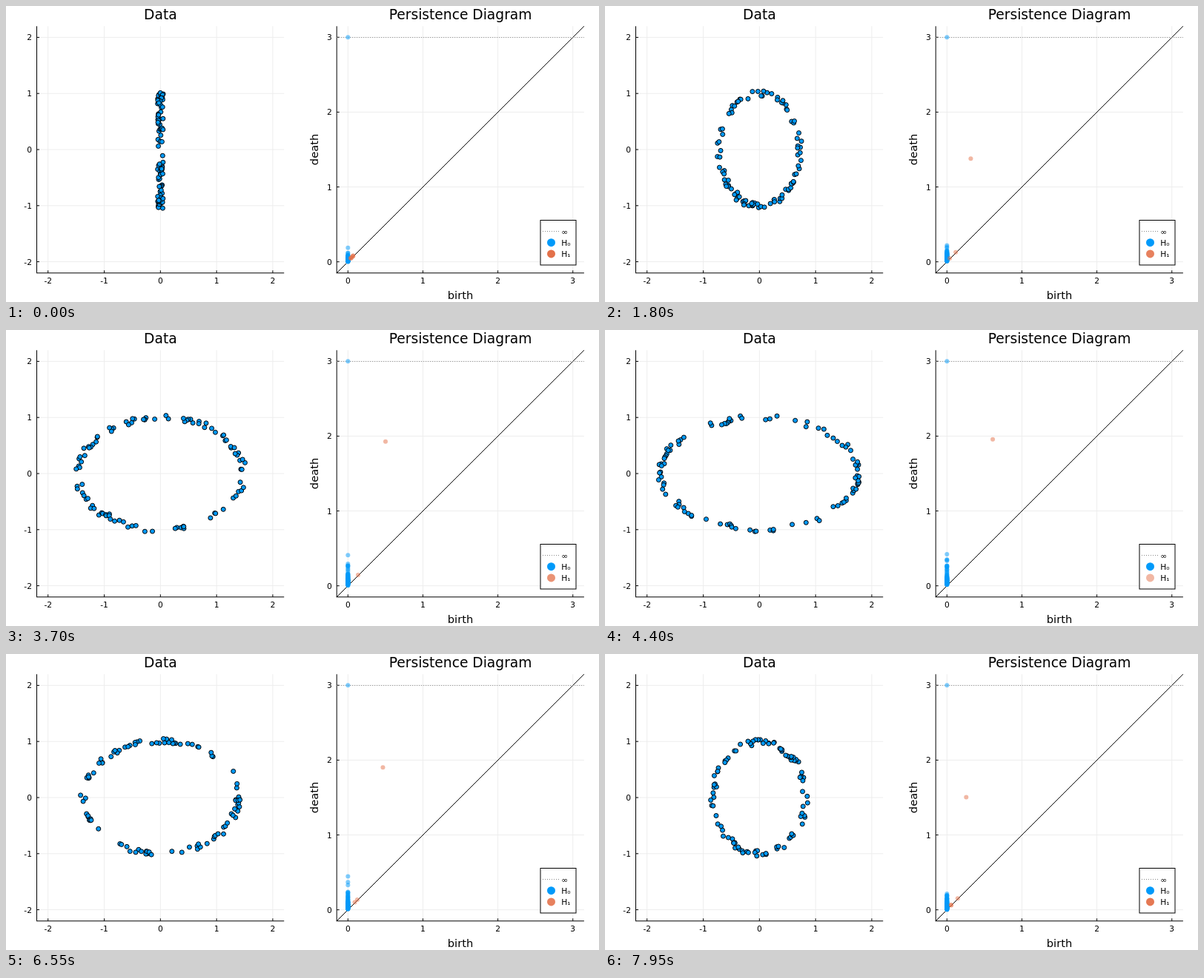
Write an HTML page with a canvas that moves like this. It is 800x400 px and loops after 8000 ms.

```html
<!DOCTYPE html>
<html lang="en">
<head>
<meta charset="utf-8">
<title>Persistence Diagram</title>
<style>
html, body { margin: 0; width: 100%; height: 100%; overflow: hidden; background: #fff; }
canvas { display: block; width: 800px; height: 400px; }
</style>
</head>
<body>
<canvas id="stage" width="800" height="400"></canvas>
<script>
const ctx = document.getElementById('stage').getContext('2d');
const BLUE = '#009afa', ORANGE = '#e36f47';
const STEP = 50, FRAMES = 160, POINTS = 100, NOISE = 0.05;
const TOP = 27.3, BOTTOM = 360.8;

const dataPlot = { left: 41.5, right: 375.2, x0: 208.3, y0: 194, scale: 75.8, ticks: [-2, -1, 0, 1, 2] };
const diagram = { left: 446.2, right: 779.9, x0: 461.3, y0: 345.7, scale: 101.15, ticks: [0, 1, 2, 3] };
const px = (plot, x) => plot.x0 + x * plot.scale;
const py = (plot, y) => plot.y0 - y * plot.scale;

function seededRandom(seed) {
  return () => {
    seed = (seed + 0x6D2B79F5) | 0;
    let t = Math.imul(seed ^ (seed >>> 15), 1 | seed);
    t = (t + Math.imul(t ^ (t >>> 7), 61 | t)) ^ t;
    return ((t ^ (t >>> 14)) >>> 0) / 4294967296;
  };
}

function line(x1, y1, x2, y2, color = '#000', width = 1, dash = []) {
  ctx.strokeStyle = color;
  ctx.lineWidth = width;
  ctx.setLineDash(dash);
  ctx.beginPath();
  ctx.moveTo(x1, y1);
  ctx.lineTo(x2, y2);
  ctx.stroke();
  ctx.setLineDash([]);
}

function text(str, x, y, size, align = 'center') {
  ctx.font = `${size}px "DejaVu Sans", sans-serif`;
  ctx.textAlign = align;
  ctx.fillStyle = '#000';
  ctx.fillText(str, x, y);
}

function dot(x, y, radius, color, alpha = 1, outlined = false) {
  ctx.globalAlpha = alpha;
  ctx.fillStyle = color;
  ctx.beginPath();
  ctx.arc(x, y, radius, 0, 2 * Math.PI);
  ctx.fill();
  ctx.globalAlpha = 1;
  if (outlined) {
    ctx.strokeStyle = '#000';
    ctx.lineWidth = 1;
    ctx.stroke();
  }
}

function drawAxes(plot, title) {
  const { left, right, ticks } = plot;
  for (const v of ticks) {
    const x = px(plot, v), y = py(plot, v);
    line(x, TOP, x, BOTTOM, '#ededed');
    line(left, y, right, y, '#ededed');
    line(x, BOTTOM, x, BOTTOM - 3.5);
    line(left, y, left + 3.5, y);
    text(String(v), x, 375, 10.67);
    text(String(v), left - 6.5, y + 4, 10.67, 'right');
  }
  line(left, TOP, left, BOTTOM);
  line(left - 0.5, BOTTOM, right, BOTTOM);
  text(title, (left + right) / 2, 17.8, 18.67);
}

// Noisy samples of an ellipse, ordered along the curve.
function sampleEllipse(a, random) {
  const jitter = () => (random() * 2 - 1) * NOISE;
  return Array.from({ length: POINTS }, () => random() * 2 * Math.PI)
    .sort((p, q) => p - q)
    .map(t => ({ x: a * Math.cos(t) + jitter(), y: Math.sin(t) + jitter() }));
}

const distance = (p, q) => Math.hypot(p.x - q.x, p.y - q.y);

// Components merge at the edge lengths of the minimum spanning tree.
function componentDeaths(points) {
  const rest = points.slice(1).map(p => ({ p, d: distance(p, points[0]) }));
  const deaths = [];
  while (rest.length) {
    let best = 0;
    rest.forEach((r, i) => { if (r.d < rest[best].d) best = i; });
    const [{ p, d }] = rest.splice(best, 1);
    deaths.push(d);
    for (const r of rest) r.d = Math.min(r.d, distance(r.p, p));
  }
  return deaths;
}

// The main loop lives from the widest gap to the ellipse's critical scale.
function loops(points, a, random) {
  const result = [];
  const count = Math.round(6 * Math.exp(-1.2 * a) + random() * 1.6 - 0.8);
  for (let i = 0; i < count; i++) {
    const r = random();
    const birth = 0.03 + 0.05 * r + 0.12 * Math.min(a, 1) * r ** 4;
    result.push([birth, birth + 0.003 + 0.01 * random()]);
  }
  const major = Math.max(a, 1), minor = Math.min(a, 1);
  const critical = major > Math.sqrt(3) * minor
    ? 2 * minor
    : 4 * Math.sqrt(3) * major * minor ** 2 / (major ** 2 + 3 * minor ** 2);
  const birth = Math.max(...points.map((p, i) => distance(p, points[(i + 1) % POINTS])));
  const death = critical - 0.02 - 0.04 * random();
  if (death > birth) result.push([birth, death]);
  return result;
}

function drawLegend(loopCount) {
  ctx.fillStyle = '#fff';
  ctx.fillRect(721, 289.5, 48, 60.5);
  ctx.strokeStyle = '#000';
  ctx.lineWidth = 1;
  ctx.strokeRect(721, 289.5, 48, 60.5);
  line(724, 304.5, 746, 304.5, '#888', 1, [1, 2]);
  dot(735.5, 319.7, 5.5, BLUE);
  dot(735.5, 334.9, 5.5, ORANGE, 1 - 0.5 ** loopCount);
  text('∞', 749.3, 308.5, 10.67, 'left');
  text('H₀', 749.3, 323.7, 10.67, 'left');
  text('H₁', 749.3, 338.9, 10.67, 'left');
}

function drawFrame(frame) {
  const random = seededRandom(frame * 7919 + 17);
  const a = 2 - Math.abs(frame - 100) * 0.02;
  const points = sampleEllipse(a, random);
  const cycles = loops(points, a, random);

  ctx.fillStyle = '#fff';
  ctx.fillRect(0, 0, 800, 400);

  drawAxes(dataPlot, 'Data');
  for (const p of points) dot(px(dataPlot, p.x), py(dataPlot, p.y), 3, BLUE, 1, true);

  drawAxes(diagram, 'Persistence Diagram');
  text('birth', 613, 396, 14.67);
  ctx.save();
  ctx.translate(421, 194);
  ctx.rotate(-Math.PI / 2);
  text('death', 0, 0, 14.67);
  ctx.restore();

  line(diagram.left, BOTTOM, diagram.right, TOP);
  line(diagram.left, 42.5, diagram.right, 42.5, '#888', 1, [1, 2]);
  const mark = (birth, death, color) => dot(px(diagram, birth), py(diagram, death), 3, color, 0.5);
  for (const death of componentDeaths(points)) mark(0, death, BLUE);
  mark(0, 3, BLUE);
  for (const [birth, death] of cycles) mark(birth, death, ORANGE);
  drawLegend(cycles.length);
}

let shown = -1;
function tick() {
  const frame = Math.floor(performance.now() / STEP) % FRAMES;
  if (frame !== shown) drawFrame(shown = frame);
  requestAnimationFrame(tick);
}
tick();
</script>
</body>
</html>
```
